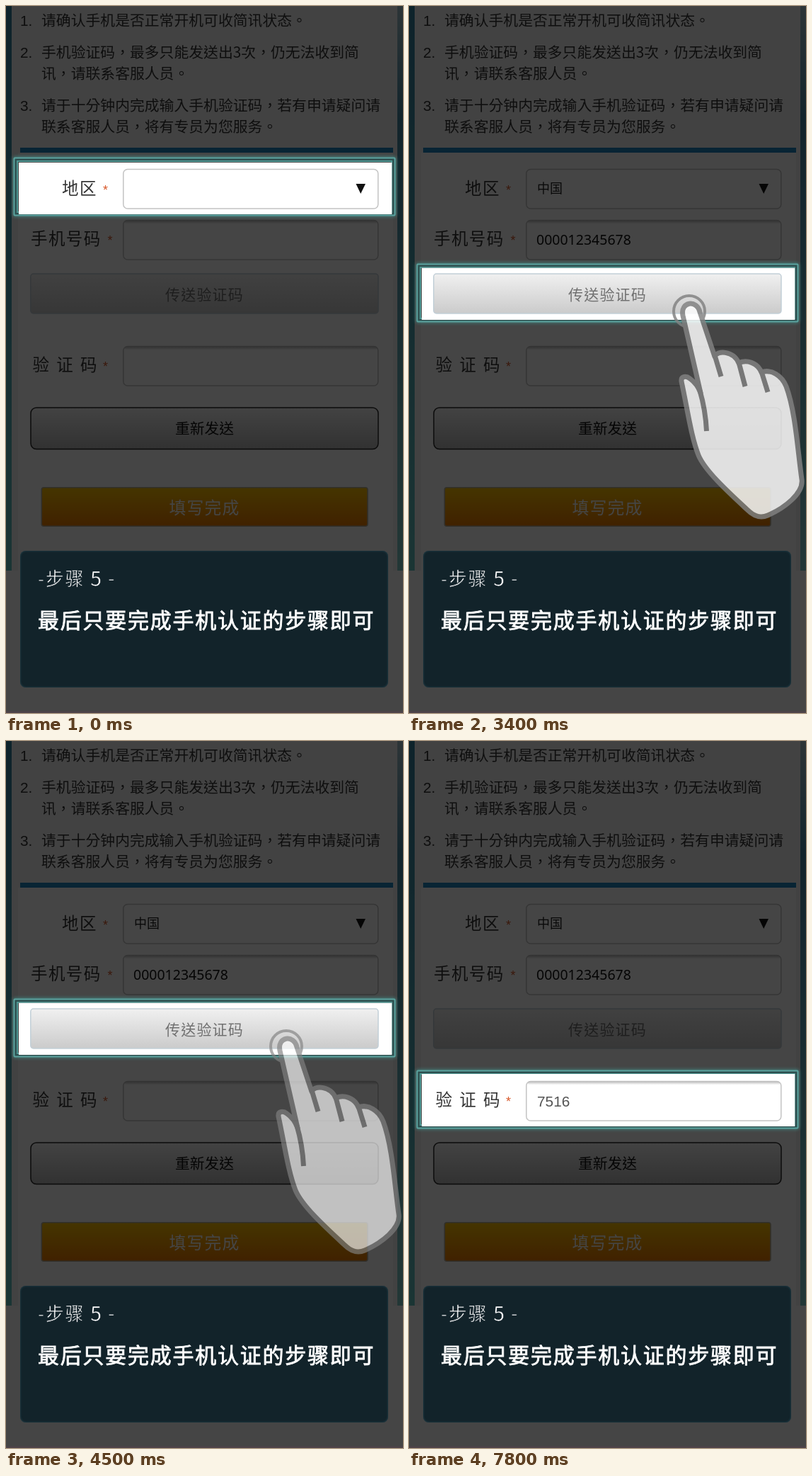
An HTML page that plays this animation: 561 by 998 pixels, repeating every 8 s.

```html
<!DOCTYPE html>
<html lang="zh-Hant">
<head>
<meta charset="utf-8">
<title>手机认证步骤</title>
<style>
html, body { margin: 0; width: 100%; height: 100%; overflow: hidden; background: #454545; }
svg { position: absolute; left: 0; top: 0; display: block; }
text { font-family: "Noto Sans CJK TC", "Noto Sans CJK SC", "Noto Sans CJK", sans-serif; white-space: pre; }
.list text { font-size: 20.83px; fill: #333; }
.list .num, .star, #code { font-family: "Liberation Sans", sans-serif; }
.label { font-size: 23.5px; letter-spacing: 1.4px; fill: #333; }
.star { font-size: 18px; fill: #d8582a; }
.field { fill: #fff; stroke: #c4c4c4; stroke-width: 1.5; }
.mid { text-anchor: middle; }
.panel { position: absolute; left: 20px; width: 520px; height: 193px; border-radius: 8px;
  background: rgba(12, 31, 39, .88); box-shadow: inset 0 0 3px #264853; }
.panel svg { overflow: visible; }
.panel text { fill: #fff; }
/* strokes thin or thicken the regular weight */
.panel .light { font-size: 27px; letter-spacing: 1.28px; font-weight: 300; stroke: #13232b; stroke-width: .6px; }
.panel .title { font-size: 30px; letter-spacing: 1.75px; font-weight: 500; stroke: #fff; stroke-width: .8px; }
#frame rect { fill: none; stroke-width: 2; }
</style>
</head>
<body>
<svg width="561" height="998" viewBox="0 0 561 998">
  <defs>
    <linearGradient id="left" x2="0" y2="1"><stop stop-color="#34809f"/><stop offset="1" stop-color="#62c4c2"/></linearGradient>
    <linearGradient id="right" x2="0" y2="1"><stop stop-color="#a4c2cc"/><stop offset=".2" stop-color="#4488a3"/><stop offset="1" stop-color="#7fcdc9"/></linearGradient>
    <linearGradient id="send" x2="0" y2="1"><stop stop-color="#f0f0f0"/><stop offset="1" stop-color="#cbcbcb"/></linearGradient>
    <linearGradient id="again" x2="0" y2="1"><stop stop-color="#f8f8f8"/><stop offset="1" stop-color="#b8b8b8"/></linearGradient>
    <linearGradient id="done" x2="0" y2="1"><stop stop-color="#ffc400"/><stop offset="1" stop-color="#ee7a00"/></linearGradient>
    <linearGradient id="inset" x2="0" y2="1"><stop stop-color="#bbb"/><stop offset="1" stop-color="#bbb" stop-opacity="0"/></linearGradient>
    <clipPath id="outside"><path class="shade" clip-rule="evenodd"/></clipPath>
  </defs>

  <rect width="561" height="998" fill="#fff"/>
  <rect width="8" height="797" fill="url(#left)"/>
  <rect x="553" width="8" height="797" fill="url(#right)"/>
  <rect x="8" width="545" height="797" fill="#f5f5f5"/>
  <rect x="17" y="207" width="530" height="590" fill="#fff"/>
  <rect x="20" y="200" width="527" height="7" fill="#1f84c2"/>

  <g class="list">
    <text class="num" x="20" y="27.5">1.</text><text x="50" y="27.5">请确认手机是否正常开机可收简讯状态。</text>
    <text class="num" x="20" y="73">2.</text><text x="50" y="73">手机验证码，最多只能发送出3次，仍无法收到简</text>
    <text x="50" y="103">讯，请联系客服人员。</text>
    <text class="num" x="20" y="148">3.</text><text x="50" y="148">请于十分钟内完成输入手机验证码，若有申请疑问请</text>
    <text x="50" y="178">联系客服人员，将有专员为您服务。</text>
  </g>

  <text class="label" x="79" y="266">地区</text><text class="star" x="137" y="266">*</text>
  <rect class="field" x="165.8" y="230.5" width="360" height="55.5" rx="6"/>
  <path d="M494.5 251H508L501.2 265z" fill="#111"/>
  <text id="area" x="181" y="264" font-size="18" fill="#222">中国</text>

  <text class="label" x="35" y="337">手机号码</text><text class="star" x="143.5" y="336.5">*</text>
  <rect class="field" x="165.8" y="302.5" width="360" height="55.5" rx="6"/>
  <rect x="168" y="302.5" width="356" height="5" rx="3" fill="url(#inset)"/>
  <text id="phone" x="180" y="337" font-size="19.5" fill="#111" style="font-family:'Noto Sans',sans-serif">000012345678</text>

  <rect x="34.8" y="378" width="491.2" height="56" rx="4" fill="url(#send)" stroke="#c2cfd8" stroke-width="1.5"/>
  <text class="mid" x="280.5" y="414.5" font-size="21" letter-spacing="1.2" fill="#707070">传送验证码</text>

  <text class="label" x="37.5" y="514.5" style="letter-spacing:10.2px">验证码</text><text class="star" x="137" y="514.5">*</text>
  <rect class="field" x="165.8" y="480.5" width="360" height="55.5" rx="6"/>
  <rect x="168" y="480.5" width="356" height="5" rx="3" fill="url(#inset)"/>
  <text id="code" x="181" y="515.5" font-size="20.8" fill="#333">7516</text>

  <rect x="35" y="567" width="491" height="58.5" rx="8" fill="url(#again)" stroke="#2a2a2a" stroke-width="1.5"/>
  <text class="mid" x="280.5" y="604" font-size="20.8" fill="#111">重新发送</text>
  <rect x="50.3" y="679.8" width="460.7" height="54.4" rx="3" fill="url(#done)" stroke="#b5b09a" stroke-width="1.6"/>
  <text class="mid" x="280.5" y="716.5" font-size="23.8" letter-spacing="1.2" fill="#fff">填写完成</text>

  <path class="shade" fill-rule="evenodd" fill="#000" fill-opacity=".73"/>
  <rect y="995.5" width="561" height="2.5" fill="#4e4349"/>

  <g clip-path="url(#outside)">
    <g id="frame">
      <rect x="11.5" y="0" width="538" height="81" rx="1" stroke="#5aa39f" style="filter:drop-shadow(0 0 2.5px #3fb4ad)"/>
      <rect x="13.8" y="2.3" width="533.4" height="76.4" stroke="#2c4f4f"/>
      <rect x="16" y="4.5" width="529" height="72" stroke="#4f9793"/>
    </g>
  </g>
</svg>

<div class="panel" id="help" style="top:140px"><svg width="520" height="193">
  <text class="light" x="25" y="49.5">填写完毕后，按下传送验证码，验证码</text>
  <text class="light" x="25" y="100">将会传送至您方才填写号码的手机简</text>
  <text class="light" x="25" y="151">讯裡。</text>
</svg></div>

<div class="panel" style="top:769px"><svg width="520" height="193">
  <text class="light" x="25" y="49" style="font-size:26px;letter-spacing:1.8px">-步骤</text>
  <text class="light" x="99" y="49.5" style="font-size:29px">5</text>
  <text class="light" x="124" y="49">-</text>
  <text class="title" x="25" y="109">最后只要完成手机认证的步骤即可</text>
</svg></div>

<svg width="561" height="998">
  <g id="hand" fill="none" stroke="#828282" stroke-width="7" stroke-linecap="round" stroke-linejoin="round">
    <circle cx="396" cy="431" r="22" stroke-width="4"/>
    <path fill="#fff" d="M412 546L387 437C383 417 407 414 411 432L432 495C435 486 458 486 466 504
      C477 499 492 503 498 517C512 512 527 522 533 537C546 572 549 625 555 668C558 688 530 709 507 719
      C495 724 486 719 478 711C452 687 418 656 409 634C399 609 394 572 385 530C384 522 392 522 397 526Q407 533 412 546"/>
    <path stroke-linecap="butt" d="M411 543Q419 570 420.500 600M432 493L441 523M466 503L475 537M498 516L507 545"/>
  </g>
</svg>

<script>
const LOOP = 8000;
// start time, hole top, hole bottom, frame top
const STAGES = [[0, 221, 294, 214.5], [1400, 295, 369, 292.5], [2800, 369.5, 443, 364.5], [6800, 470, 544, 465.5]];
const $ = id => document.getElementById(id);
const shades = document.querySelectorAll('.shade');

// six equal steps from clear to solid
const fade = (t, start) => Math.max(0, Math.min(6, Math.floor((t - start) / 200))) / 6;

function handOpacity(t) {
  if (t < 2900 || t >= 6800) return 0;
  if (t >= 4700) return 1;
  const step = Math.floor((t - 2900) / 100) % 12;
  return 1 - Math.abs(step - 6) / 6;
}

function draw(now) {
  const t = now % LOOP;
  const [, top, bottom, frameTop] = STAGES.filter(s => t >= s[0]).pop();
  const d = `M0 0H561V998H0ZM18 ${top}H545.5V${bottom}H18Z`;
  shades.forEach(s => s.setAttribute('d', d));
  $('frame').setAttribute('transform', `translate(0 ${frameTop})`);
  $('area').style.opacity = fade(t, 0);
  $('phone').style.opacity = fade(t, 1400);
  $('code').style.opacity = fade(t, 6800);
  $('hand').style.opacity = handOpacity(t);
  $('help').style.visibility = t >= 4800 && t < 6800 ? 'visible' : 'hidden';
}

const begin = performance.now();
function tick() {
  draw(performance.now() - begin);
  requestAnimationFrame(tick);
}
tick();
</script>
</body>
</html>
```
